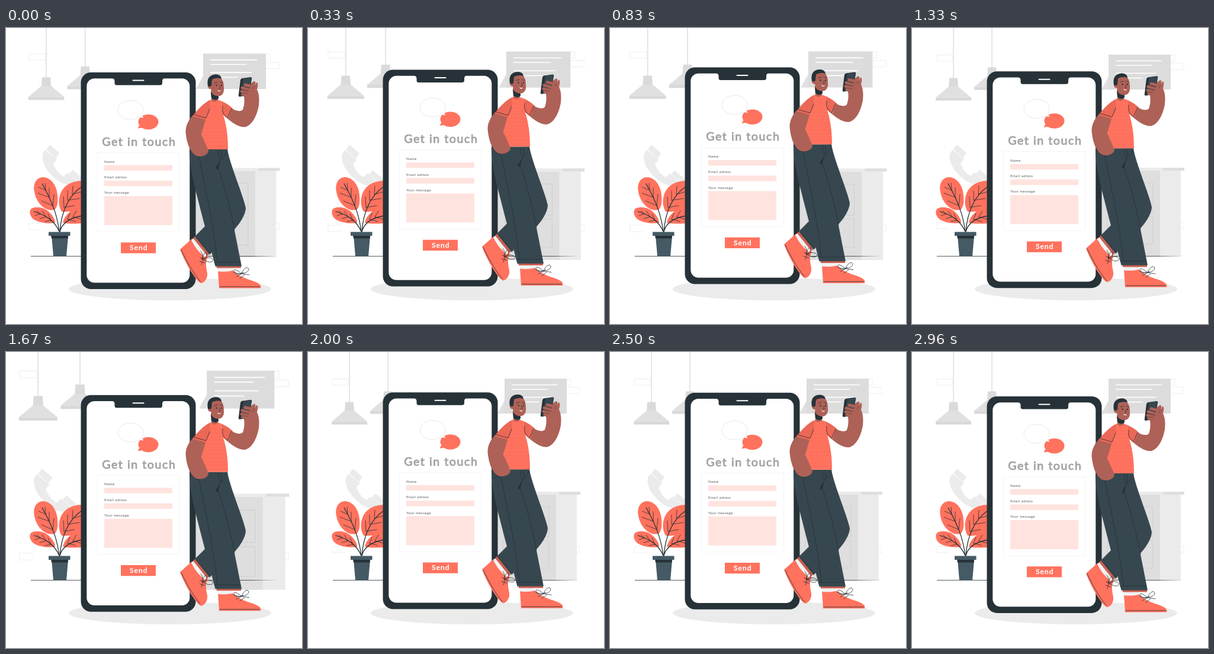
An HTML page that plays this animation: 500 by 500 pixels, repeating every 3000 ms.

```html
<!DOCTYPE html>
<html lang="en">
<head>
<meta charset="utf-8">
<title>Get in touch</title>
<style>
html, body { margin: 0; width: 100%; height: 100%; overflow: hidden; background: #fff; }
svg { display: block; width: 100%; height: 100%; }
text { font-family: Lato, "Open Sans", sans-serif; fill: currentColor; stroke: currentColor; stroke-linejoin: round; }
.title { font-size: 19.500px; letter-spacing: 1.600px; stroke-width: .9; color: #a3a3a3; text-anchor: middle; }
.label { font-size: 6px; letter-spacing: .5px; stroke-width: .2; color: #8c8c8c; }
.send { font-size: 12px; letter-spacing: 1.100px; stroke-width: .5; color: #fff; text-anchor: middle; }
.line { fill: none; stroke: #263238; stroke-width: .8; stroke-linecap: round; stroke-linejoin: round; }
.coral { fill: #ff725e; }
.dark { fill: #263238; }
.denim { fill: #37474f; }
.skin { fill: #ae6157; }
.field { fill: #ffe3df; }
</style>
</head>
<body>
<svg viewBox="0 0 500 500">
  <defs>
    <g id="lamp" fill="#e0e0e0">
      <path d="M-.8-60H.8V85H-.8Z"/>
      <path d="M-7 84.500H7L8 99.500H-8Z" fill="#dadada"/>
      <path d="M-8 99H8L30 117.500H-30Z"/>
      <path d="M-30 117.500H30V122.500H-30Z" fill="#d8d8d8"/>
    </g>
    <linearGradient id="fade" gradientUnits="userSpaceOnUse" x1="42" x2="456" y1="0" y2="0">
      <stop offset="0" stop-color="#263238"/>
      <stop offset=".9" stop-color="#263238"/>
      <stop offset="1" stop-color="#e0e0e0"/>
    </linearGradient>
  </defs>

  <g id="room">
    <path fill="none" stroke="#ebebeb" stroke-width=".8" d="M41 45.500H68V56H41ZM62 328.500H41V339H63M437 45.500H444V56H437M437 59.500H459V70H437M454 328.500H459V339H454"/>
    <use href="#lamp" x="70"/>
    <use href="#lamp" x="135" y="-18"/>
    <path fill="#e0e0e0" d="M332 82L320 104H332Z"/>
    <path fill="#dcdcdc" d="M332 45H437V104H332Z"/>
    <path stroke="#fff" stroke-width="1.600" d="M344 55.500H422M344 63H405M344 76.500H413M344 84.500H390"/>
    <path fill="#ebebeb" d="M69 206C61 211 62 224 70 237C82 254 98 266 114 264L126 260L106 244L99 250C91 246 84 237 82 228L88 222ZM76 197L92 211L86 220L70 205ZM114 239L132 254L126 261L108 246Z"/>
    <path fill="#ebebeb" d="M310 236H424V241H310ZM419 241H454V385.500H419Z"/>
    <path fill="#dedede" d="M310 241H419V385.500H310ZM424 236H460V241H424Z"/>
    <path fill="none" stroke="#cfcfcf" d="M330 261.500H407V312H330ZM330 318.500H407V365H330Z"/>
  </g>

  <path stroke="url(#fade)" stroke-width=".8" fill="none" d="M42 385.500H456"/>
  <ellipse cx="277" cy="441" rx="171" ry="19" fill="#ebebeb"/>

  <g id="plant">
    <path class="coral" d="M82 307C66 311 51 295 48 277C45 262 52 252 63 252C77 253 86 267 87 283C88 294 87 303 82 307ZM94 310C86 297 89 277 101 267C111 259 124 257 134 259V299C122 308 106 312 94 310ZM83 329C73 331 56 329 48 324C40 319 38 309 43 305C53 300 67 304 74 312C80 318 83 324 83 329ZM96 329C98 318 108 308 120 304L135 302V329C122 331 106 331 96 329Z"/>
    <g class="line">
      <path stroke-width="1.300" d="M90 344C87 322 82 300 61 263M91 344C93 314 104 284 128 268M90 344C82 325 67 316 47 310M91 344C95 328 110 320 130 317"/>
      <path d="M67 274L66 262M67 274L55 269M73 286L73 270M73 286L54 279M79 300L81 281M79 300L60 292M98 303L97 285M98 303L116 300M104 291L104 275M104 291L124 288M112 281L113 267M112 281L130 276M58 314L52 309M58 314L49 317M68 319L61 309M68 319L57 322M76 325L71 314M76 325L66 327M104 323L108 313M104 323L118 327M113 319L119 309M113 319L127 323"/>
    </g>
    <path fill="#455a64" d="M72 344.500H108.500V351H72ZM77 351H105L102 385.500H80Z"/>
    <path class="dark" d="M76 351H105L104.500 355.500H77Z"/>
  </g>

  <g id="float">
    <rect class="dark" x="126.500" y="75" width="194" height="366" rx="17"/>
    <rect fill="#fff" x="136.300" y="85.300" width="174" height="345" rx="13"/>
    <path class="dark" d="M180 84.500H267V85.300Q264 86 264 90V93Q264 96.500 260 96.500H187Q183.500 96.500 183.500 93V90Q183.500 86 180 85.300Z"/>
    <path stroke="#fff" stroke-width="2" stroke-linecap="round" d="M214.500 88.500H232.500"/>
    <path class="coral" d="M223.500 158.500C223.500 151.500 231 146 240.500 146S257.500 151.500 257.500 158.500S250 171.500 240.500 171.500C236 171.500 232.500 170.500 229.500 168.500L222.500 169.500L225.500 164C224 162.500 223.500 160.500 223.500 158.500Z"/>
    <path fill="#fff" stroke="#dedede" stroke-width=".7" d="M189 138.500C189 129.500 198.500 122.500 210.500 122.500S232 129.500 232 138.500C232 141.500 231 144 229.500 146.500L232 151.500L224.500 150.500C220.500 153 215.500 154.500 210.500 154.500C198.500 154.500 189 147.500 189 138.500Z"/>
    <text class="title" x="224.800" y="198.800">Get in touch</text>
    <path fill="none" stroke="#f1f1f1" stroke-width=".8" d="M154.500 210.500H293V344H154.500Z"/>
    <text class="label" x="166" y="227.700">Name</text>
    <text class="label" x="166" y="254">Email adress</text>
    <text class="label" x="166" y="280.300">Your message</text>
    <path class="field" d="M166 231.500H281V241H166ZM166 257.700H281V267.200H166ZM166 284H281V333H166Z"/>
    <path class="coral" d="M194 362.300H253V380.500H194Z"/>
    <text class="send" x="224.300" y="375.200">Send</text>

    <!-- crossed leg -->
    <path class="coral" d="M294 374L314 356C319 366 327 376 337 381L341 387C336 394 338 404 340 414C341 423 335 431 329 431C320 426 303 398 294 374Z"/>
    <path fill="#f2f2f2" d="M313 358L318 354L341 381L336 387C326 379 318 369 313 358Z"/>
    <path fill="#c95f50" d="M316 355L320 351L344 381L340 385Z"/>
    <path class="denim" d="M345 206L374 205C378 230 402 286 405 304C405 318 388 342 372 352L344 383L319 352L345 326Z"/>
    <path class="dark" d="M338 332L350 320L358 368L349 377C343 364 340 348 338 332Z" opacity=".55"/>
    <path class="line" d="M296 375C305 394 315 412 328 428M322 354L346 381"/>
    <path class="line" stroke-width="1.100" d="M329 377C334 383 333 392 330 400M328 388L337 391M327 394L336 397M331 390C335 377 341 376 338 387C336 391 333 392 331 390C338 387 348 387 350 392C348 398 338 395 331 390"/>

    <!-- standing leg -->
    <path class="coral" d="M358 410L360 439.500H430C433 434 425 429 410 425C396 420 389 415 382 409C374 412 366 411 358 410Z"/>
    <path fill="#f2f2f2" d="M357 404H381L382 410C374 412 365 412 358 411Z"/>
    <path fill="#c95f50" d="M355 401H397V405.500H356Z"/>
    <path class="denim" d="M310 205C309 225 316 258 322 281C333 325 346 372 353.500 402.500H398L386 342C380 310 371 272 359 237L374 205Z"/>
    <path class="dark" d="M354 236L362 224L358 240Z"/>
    <path class="line" d="M359 238C371 274 380 310 386 342M326 218C338 278 350 330 357 395M352 395.500H396M359 207C358 217 362 220 362 224M363 207C365 214 365 219 362 224M374 207C371 212 370 217 364 221"/>
    <path class="line" d="M361 437H428"/>
    <path class="line" stroke-width="1.100" d="M384 412C390 415 395 416 401 413M389 420L398 415M395 423L403 417M398 415C387 406 383 407 386 412C389 417 394 416 398 415C401 406 408 402 410 407C410 412 404 414 398 415L411 417"/>

    <!-- left arm and shirt -->
    <path class="skin" d="M317 146C309 154 303 165 303.500 176C305 192 310 210 321 216C331 219 342 214 342 207C341 199 335 187 330 180L339 152Z"/>
    <path class="line" d="M311 205C314 212 319 217 326 218"/>
    <path class="coral" d="M346 121C340 124 337 127 333 130L337 155C334 166 331 175 330 180C334 189 338 197 341 205H375C375 185 373 166 367 147L367 125C364 123 360 122 357 121Z"/>
    <path fill="#eb6856" d="M344 122C334 127 324 137 315 149L337 155L345 136ZM365 124C372 127 378 131 383 136L375 154L367 147Z"/>
    <g fill="none" stroke="#f0695a" stroke-width=".5">
      <path d="M346 133H365M344 139H366M342 145H367M340 151H368M336 157H370M335 163H371M333 169H372M331 175H373M331 181H374M334 187H374M337 193H375M339 199H375"/>
    </g>
    <path class="line" d="M317 146L338 152L344 137M366 132C365 139 366 144 370 148L374 152L381 136"/>

    <!-- head -->
    <path class="skin" d="M346 106L347 122C351 126 356 125 358 121V110Z"/>
    <path class="dark" d="M346 107C348 112 353 115 359 115V119C355 123 349 121 347 118Z"/>
    <path class="skin" d="M343 92C344 83 352 81 360 83C367 86 368 94 368 101C369 109 365 115 359 115C352 115 347 110 346 103C341 104 339 96 343 95Z"/>
    <path class="dark" d="M341 98C339 88 342 81 350 79C357 77 364 80 364 86C358 83 352 85 348 87L347 97L345 99Z"/>
    <ellipse class="dark" cx="355.500" cy="97" rx="1" ry="1.400"/>
    <ellipse class="dark" cx="364" cy="97" rx="1" ry="1.400"/>
    <path class="line" d="M352 93L357 91.500M362 91.500L366 93M361 98L362 102L360 102.500"/>
    <path fill="#fff" d="M357 104.500C359 106 361 106.300 363 105.500C362 108 358 107.500 357 104.500Z"/>

    <!-- raised arm with handset -->
    <path class="skin" d="M382 136C388 140 396 142 400 138C403 130 403 122 402 116C397 113 397 107 403 103L417 91C421 88 423 92 420 98L423 92C427 92 425 100 424 104C428 112 428 122 427 131C424 147 417 163 405 167C395 169 384 161 375 154Z"/>
    <path class="dark" d="M399 85L413 83Q416 83 415 87L410 113L395 116Q392 116 393 112L396 88Q397 85 399 85Z"/>
    <path class="denim" d="M401 85L413 84Q415 84 414 87L409 112L396 115Z"/>
    <path fill="none" stroke="#ae6157" stroke-width="5" stroke-linecap="round" d="M417 99L404 96M416 105L399 101M415 110L398 107M413 114L400 112"/>
    <path class="line" stroke-width=".5" opacity=".55" d="M402 99L411 102M399 104.500L409 107M400 110L408 111M420 98L417 103"/>
  </g>
</svg>
<script>
const LOOP = 3000, CYCLE = 1500, LEAD = 16;
const room = document.getElementById("room");
const float = document.getElementById("float");

// Two beats per cycle, given as [phase, scale].
const beats = [[0, 1], [.1, 1.1], [.3, 1], [.4, 1], [.5, 1.1], [.6, 1], [1, 1]];

function beat(p) {
  const i = beats.findIndex(b => b[0] > p);
  const [p0, s0] = beats[i - 1], [p1, s1] = beats[i];
  return s0 + (s1 - s0) * (p - p0) / (p1 - p0);
}

const start = performance.now();

function draw() {
  const t = (performance.now() - start) % LOOP;
  const p = (t + LEAD) % CYCLE / CYCLE;
  const lift = 10 * (1 - Math.abs(2 * p - 1));
  room.setAttribute("transform", `translate(250 200) scale(${beat(p)}) translate(-250 -200)`);
  float.setAttribute("transform", `translate(0 ${.2 - lift})`);
  requestAnimationFrame(draw);
}
draw();
</script>
</body>
</html>
```
